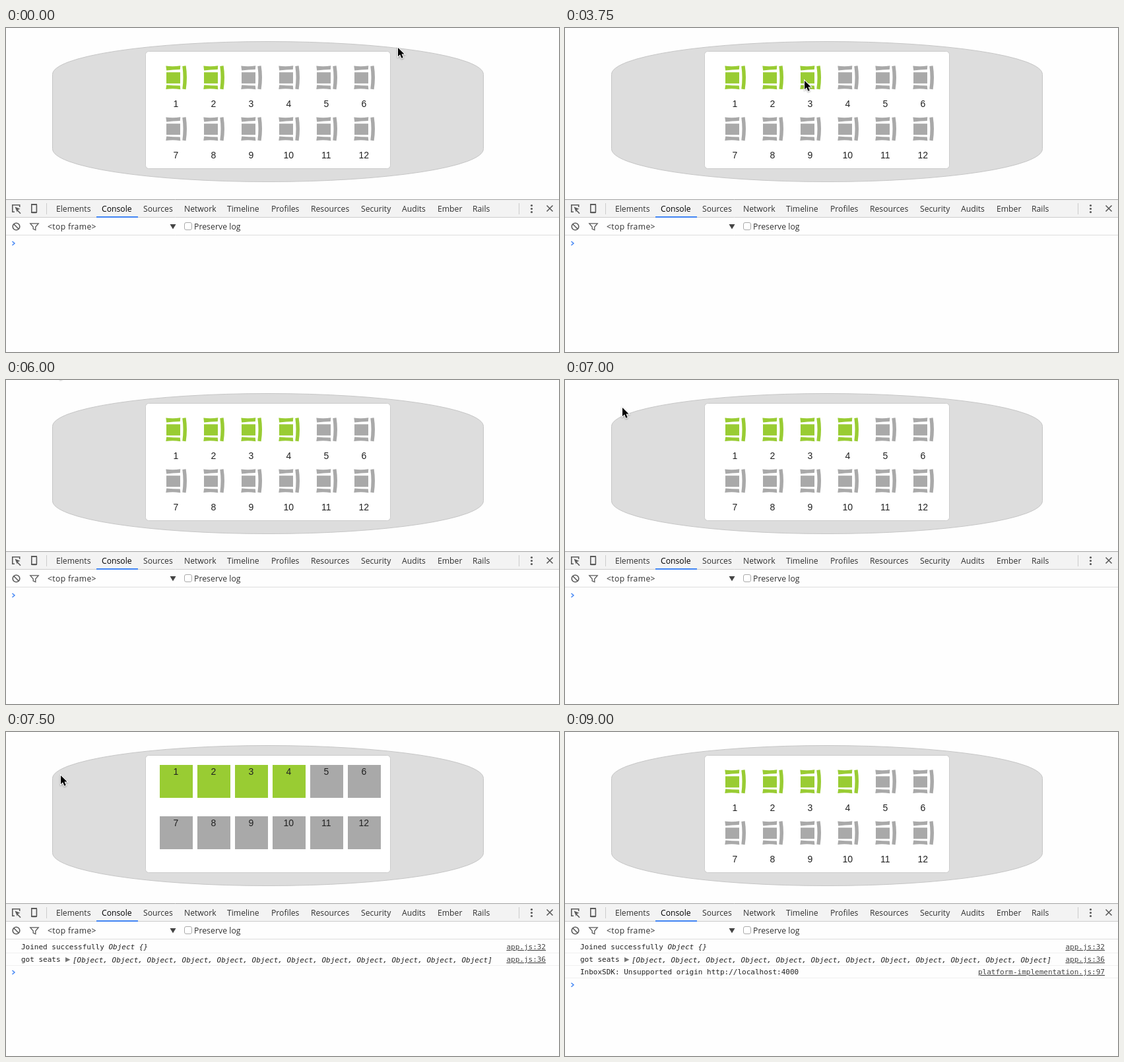
Write an HTML page that moves like this. It is 838 by 492 pixels and loops after 10 s.

```html
<!DOCTYPE html>
<html lang="en">
<head>
<meta charset="utf-8">
<title>Seat picker</title>
<style>
html, body { margin: 0; width: 100%; height: 100%; overflow: hidden; background: #fefefe; }
svg { display: block; width: 838px; height: 492px; }

.anim, .table, .panel, .seat, .icon, .square, .label, .cursor {
  animation: 10s step-end infinite;
}

/* seating plan */
.table { x: 70.5px; y: 20.5px; width: 653px; height: 213px; rx: 326.5px; ry: 50px;
  fill: #ddd; stroke: #c6c6c6; animation-name: table; }
.panel { x: 211.5px; y: 35.5px; width: 371px; height: 178px; rx: 5px;
  fill: #fff; stroke: #ccc; animation-name: panel; }
@keyframes table {
  72.5% { width: 311px; height: 57px; rx: 155.5px; ry: 24px; }
  75% { width: 653px; height: 213px; rx: 326.5px; ry: 50px; }
}
@keyframes panel {
  72.5% { width: 29px; height: 22px; }
  75% { width: 371px; height: 178px; }
}
.seats { animation-name: seats; }
@keyframes seats { 72.5% { visibility: hidden; } 75% { visibility: visible; } }
.seat { color: #a9a9a9; }
.taken { color: #9c3; }
.third { animation-name: third; }
.fourth { animation-name: fourth; }
@keyframes third { 20% { color: #9c3; } 30% { color: #a9a9a9; } 37.5%, 100% { color: #9c3; } }
@keyframes fourth { 47.5%, 100% { color: #9c3; } }
.icon, .square { fill: currentColor; }
.icon { animation-name: icon; }
.square { opacity: 0; animation-name: square; }
.label { font: 14px "Liberation Sans", Arial, sans-serif; text-anchor: middle; fill: #222;
  animation-name: label; }
@keyframes icon { 75% { opacity: 0; } 77.5% { opacity: 1; } }
@keyframes square { 75% { opacity: 1; } 77.5% { opacity: 0; } }
@keyframes label { 75% { transform: translateY(-55px); } 77.5% { transform: none; } }

/* developer tools */
.ui { font: 12.2px "Open Sans", "Noto Sans", sans-serif; fill: #303030; }
.mono { font: 11px "DejaVu Sans Mono", monospace; fill: #222; white-space: pre; }
.mono i, .it { font-style: italic; }
.link { text-anchor: end; text-decoration: underline; fill: #444; }
.glyph { fill: none; stroke: #5a5a5a; stroke-width: 1.6; }
.solid { fill: #5a5a5a; }
.rule { stroke: #f0f0f0; }
.log-option { animation-name: log-option; }
@keyframes log-option { 65% { transform: translateX(-34px); } 70% { transform: none; } }
.joined { visibility: hidden; animation-name: joined; }
.origin { visibility: hidden; animation-name: origin; }
@keyframes joined { 72.5%, 100% { visibility: visible; } }
@keyframes origin { 80%, 100% { visibility: visible; } }
.prompt { fill: none; stroke: #4285f4; stroke-width: 1.5; animation-name: prompt; }
@keyframes prompt {
  72.5% { transform: translateY(38px); }
  80%, 100% { transform: translateY(57px); }
}

.cursor { filter: drop-shadow(0 1px 1px #0005); animation-name: cursor; }
.cursor path { stroke: #fff; stroke-width: 2; paint-order: stroke; }
@keyframes cursor {
  0% { transform: translate(593px, 28px); }
  2.5% { transform: translate(377px, 70px); }
  5% { transform: translate(346px, 72px); }
  7.5% { transform: translate(360px, 73px); }
  15% { transform: translate(361px, 77px); }
  17.5% { transform: translate(362px, 78px); }
  42.5% { transform: translate(407px, 78px); }
  45% { transform: translate(425px, 78px); }
  52.5% { transform: translate(358px, 48px); }
  55% { transform: translate(160px, 8px); }
  57.5% { transform: translate(80px, -19px); }
  60% { transform: translate(76px, -19px); }
  67.5% { transform: translate(91px, 12px); }
  70% { transform: translate(86px, 40px); }
  72.5% { transform: translate(81px, 63px); }
  75% { transform: translate(82px, 64px); }
  77.5% { transform: translate(81px, 65px); }
  87.5% { transform: translate(173px, 21px); visibility: visible; }
  90%, 100% { transform: translate(173px, 21px); visibility: hidden; }
}
</style>
</head>
<body>
<svg viewBox="0 0 838 492">
  <defs>
    <path id="chair" d="M.3 .5Q11 1.9 22.3.3L21.8 6Q11 6.3 1.2 7.4Z
      M1 10.2H22V27.3H1Z
      M1.2 29.4Q11 30.5 21.8 30.6L22.3 36.2Q11 34.6.3 36Z
      M25.3.9L30.6.2Q33.4 18 30.6 36.3L25.3 35.6Q27.7 18 25.3.9Z"/>
  </defs>

  <rect class="table"/>
  <rect class="panel"/>
  <g id="seats" class="anim seats"></g>

  <rect y="260" width="838" height="28" fill="#f3f3f3"/>
  <path d="M0 260.5H838" stroke="#a3a3a3"/>
  <path d="M0 287.5H838" stroke="#ccc"/>
  <path d="M0 314.5H838" stroke="#ddd"/>
  <path d="M61.5 266V283M777.5 266V283" stroke="#ccc"/>
  <rect x="137" y="286" width="63" height="2" fill="#4285f4"/>
  <g id="tabs" class="ui"></g>

  <g class="glyph">
    <path d="M13 279.2H9.8V268.8H20.7V272M17.5 277L22 281.8"/>
    <rect x="38.8" y="267.8" width="7.6" height="12.6" rx="1.2"/>
    <path d="M819.5 269.5L828.5 278.5M828.5 269.5L819.5 278.5"/>
    <circle cx="15.5" cy="301.5" r="5.3"/>
    <path d="M11.8 297.8L19.2 305.2"/>
    <path d="M36.8 296.8H49.2L44.8 302V306.8L41.2 305V302Z" stroke-width="1.3"/>
  </g>
  <g class="solid">
    <path d="M13.5 271.5L21.5 274.7 18.2 276 16.8 279.5Z"/>
    <path d="M38 267H47V269H38ZM38 279H47V281H38Z"/>
    <circle cx="796.5" cy="269.5" r="1.6"/>
    <circle cx="796.5" cy="274.5" r="1.6"/>
    <circle cx="796.5" cy="279.5" r="1.6"/>
  </g>
  <text class="ui" x="63" y="306" letter-spacing=".35">&lt;top frame&gt;</text>
  <g class="anim log-option">
    <path d="M248.5 298H257.5L253 305.5Z" fill="#444"/>
    <rect x="270.5" y="295.5" width="11" height="11" rx="2.5" fill="#fff" stroke="#aaa"/>
    <text class="ui" x="285" y="306" letter-spacing=".07">Preserve log</text>
  </g>

  <g class="anim joined">
    <path class="rule" d="M0 335.5H838M0 354.5H838"/>
    <text class="mono" x="23" y="330">Joined successfully <tspan class="it">Object {}</tspan></text>
    <text class="mono link" x="818" y="330">app.js:32</text>
    <text class="mono" x="23" y="349">got seats</text>
    <path d="M90 342L97.5 345.8 90 349.6Z" fill="#777"/>
    <text class="mono it" id="objects" x="101" y="350"></text>
    <text class="mono link" x="818" y="349">app.js:36</text>
  </g>
  <g class="anim origin">
    <path class="rule" d="M0 373.5H838"/>
    <text class="mono" x="23" y="368">InboxSDK: Unsupported origin http://localhost:4000</text>
    <text class="mono link" x="818" y="368">platform-implementation.js:97</text>
  </g>
  <path class="anim prompt" d="M9.5 324L13 327 9.5 330"/>

  <g class="cursor">
    <path d="M1 2V15.2L4.1 12.3 6.4 17.8 8.8 16.8 6.5 11.4H10.6Z"/>
  </g>
</svg>
<script>
const fill = (id, html) => { document.getElementById(id).innerHTML = html; };

const kinds = ['taken', 'taken', 'third', 'fourth'];
const seat = (_, i) => {
  const x = 233 + 57 * (i % 6), y = 50 + 78 * Math.floor(i / 6);
  return `<g class="seat ${kinds[i] || ''}">
    <rect class="square" x="${x}" y="${y}" width="50" height="50"/>
    <g class="icon"><use href="#chair" x="${x + 9}" y="${y + 7}"/></g>
    <text class="label" x="${x + 24.3}" y="${y + 70}">${i + 1}</text></g>`;
};
fill('seats', Array.from({ length: 12 }, seat).join(''));

const tabs = {
  Elements: 76, Console: 145, Sources: 208, Network: 270, Timeline: 335, Profiles: 402,
  Resources: 462, Security: 538, Audits: 600, Ember: 654, Rails: 707
};
fill('tabs', Object.entries(tabs).map(([name, x]) =>
  `<text x="${x}" y="279"${name === 'Console' ? ' fill="#000"' : ''}>${name}</text>`).join(''));

fill('objects', `[${Array(12).fill('Object').join(', ')}]`);
</script>
</body>
</html>
```
